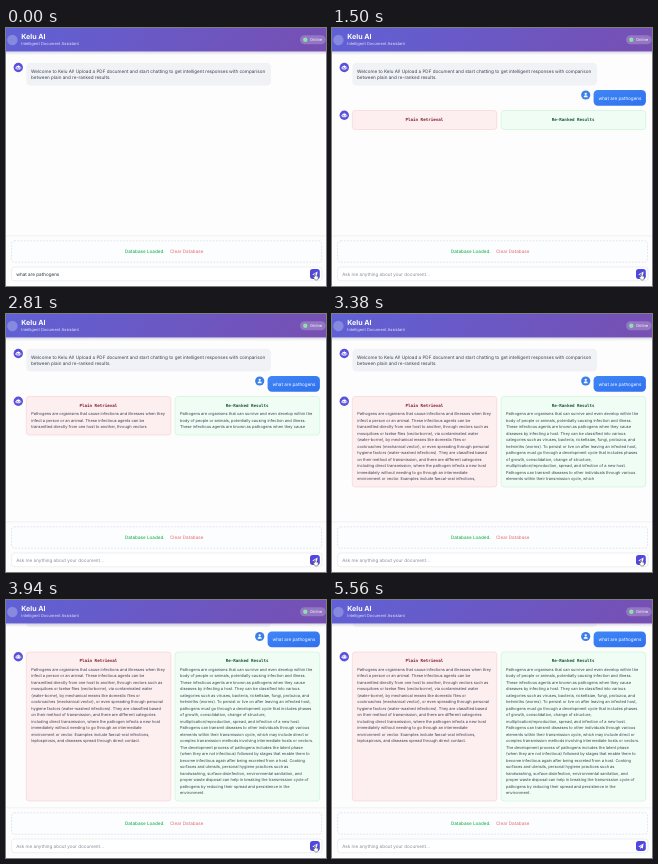
An HTML page for the animation above (5.62 s loop, 320 px wide and 258 px high).

```html
<!DOCTYPE html>
<html lang="en">
<head>
<meta charset="utf-8">
<title>Document chat</title>
<style>
  html, body { margin: 0; width: 100%; height: 100%; overflow: hidden; background: #fdfdfe; }
  svg { display: block; width: 100vw; height: 100vh; }
  text { font-family: Inter, sans-serif; font-size: 4.6px; text-rendering: geometricPrecision; white-space: pre; }
  .body text { font-size: 3.97px; fill: #374151; }
  .body .cardTitle { font: bold 4.2px "DejaVu Sans Mono", monospace; text-anchor: middle; }
  .small { font-size: 4.03px; }
  .brand { font-size: 7.05px; font-weight: 700; }
</style>
</head>
<body>
<svg viewBox="0 0 320 258" preserveAspectRatio="none">
  <defs>
    <linearGradient id="head" gradientUnits="userSpaceOnUse" x1="74" y1="-74" x2="246" y2="98">
      <stop offset="0" stop-color="#5f61d6"/>
      <stop offset="1" stop-color="#774fb1"/>
    </linearGradient>
    <linearGradient id="shade" x1="0" y1="0" x2="0" y2="1">
      <stop offset="0" stop-color="#4b4680" stop-opacity=".2"/>
      <stop offset="1" stop-color="#4b4680" stop-opacity="0"/>
    </linearGradient>
    <linearGradient id="bubble" x1="0" y1="0" x2="1" y2="1">
      <stop offset="0" stop-color="#3f87f6"/>
      <stop offset="1" stop-color="#2f70ee"/>
    </linearGradient>
    <g id="bot">
      <circle r="4.7" fill="#5a50dc"/>
      <path d="M0-2.5V-1.4M-2.6-.3V1.2M2.6-.3V1.2" stroke="#fff" stroke-width=".6"/>
      <rect x="-2" y="-1.5" width="4" height="3.5" rx=".7" fill="#fff"/>
      <path d="M-1.3-.3h.8v.8h-.8zM.5-.3h.8v.8H.5zM-1.2 1.1h2.4v.4h-2.4z" fill="#5a50dc"/>
    </g>
  </defs>

  <rect width="320" height="258" fill="#fdfdfe"/>

  <g id="chat">
    <use href="#bot" x="12.3" y="39.5"/>
    <rect x="20.3" y="34.8" width="244.7" height="22.8" rx="4.3" fill="#f1f2f5"/>
    <g fill="#374151">
      <text x="25" y="44.6">Welcome to Kelu AI! Upload a PDF document and start chatting to get intelligent responses with comparison</text>
      <text x="25" y="51.3">between plain and re-ranked results.</text>
    </g>
    <g id="reply">
      <circle cx="253.7" cy="67" r="4.6" fill="#3b7fe8"/>
      <circle cx="253.7" cy="65.8" r="1.15" fill="#fff"/>
      <path d="M251.6 69.3a2.1 2.1 0 0 1 4.2 0z" fill="#fff"/>
      <rect x="261.6" y="62" width="52.3" height="15.7" rx="4.2" fill="url(#bubble)"/>
      <text x="266.4" y="71.6" fill="#fff">what are pathogens</text>
      <use href="#bot" x="12.3" y="87.3"/>
      <g class="body" id="cards"></g>
    </g>
  </g>

  <rect y="23.5" width="320" height="3.5" fill="url(#shade)"/>
  <rect width="320" height="23.5" fill="url(#head)"/>
  <circle cx="6.4" cy="12" r="5.2" fill="#8789df"/>
  <text class="brand" x="15.3" y="11.1" fill="#fff">Kelu AI</text>
  <text class="small" x="15.3" y="17.4" fill="#e4e3f8">Intelligent Document Assistant</text>
  <rect x="294" y="7.3" width="25.8" height="9" rx="4.5" fill="#fff" fill-opacity=".22"/>
  <circle cx="299.3" cy="11.8" r="2.2" fill="#8be0ac"/>
  <text class="small" x="304" y="13.2" fill="#fff">Online</text>

  <rect y="207.5" width="320" height="50.5" fill="#fdfdfe"/>
  <path d="M0 207.8H320" stroke="#e3e5ea" stroke-width=".5"/>
  <rect x="5.6" y="212.8" width="310" height="21.4" rx="3" fill="#fcfdfe" stroke="#c9d3df" stroke-width=".6" stroke-dasharray="1.8 1.4"/>
  <text x="118.9" y="225.3" fill="#22b455" font-weight="500">Database Loaded.</text>
  <text x="164" y="225.3" fill="#e0696e">Clear Database</text>
  <rect x="5.6" y="239" width="310.4" height="13.8" rx="3" fill="#fff" stroke="#dfe3ea" stroke-width=".6"/>
  <text id="field" x="10.2" y="247.6"></text>
  <rect x="304" y="241.1" width="9.8" height="9.8" rx="2.6" fill="#5147df"/>
  <path d="M306.3 246.4L311.6 243.5L310.8 248.4L309.2 247.7L308.3 248.9V247.3L310.5 244.8L307.7 247Z" fill="#fff"/>
  <path id="hand" d="M308.6 249V246.3q0-.6.5-.6t.5.6V247.8l2.1.5q.7.2.6 1l-.3 1.9q-.2.8-1 .8h-1.4q-.6 0-.9-.5l-1.4-2q-.2-.5.3-.7z"
        fill="#fff" stroke="#222" stroke-width=".45"/>
</svg>

<script>
const LOOP = 5620, SEND = 380;
const TOP = 82.5, EMPTY = 19, PITCH = 6.5, VIEW_BOTTOM = 201;

const plain = `Pathogens are organisms that cause infections and illnesses when they
infect a person or an animal. These infectious agents can be
transmitted directly from one host to another, through vectors such as
mosquitoes or tsetse flies (vectorborne), via contaminated water
(water-borne), by mechanical means like domestic flies or
cockroaches (mechanical vector), or even spreading through personal
hygiene factors (water-washed infections). They are classified based
on their method of transmission, and there are different categories
including direct transmission, where the pathogen infects a new host
immediately without needing to go through an intermediate
environment or vector. Examples include faecal-oral infections,
leptospirosis, and diseases spread through direct contact.`;

const ranked = `Pathogens are organisms that can survive and even develop within the
body of people or animals, potentially causing infection and illness.
These infectious agents are known as pathogens when they cause
diseases by infecting a host. They can be classified into various
categories such as viruses, bacteria, rickettsiae, fungi, protozoa, and
helminths (worms). To persist or live on after leaving an infected host,
pathogens must go through a development cycle that includes phases
of growth, consolidation, change of structure,
multiplication/reproduction, spread, and infection of a new host.
Pathogens can transmit diseases to other individuals through various
elements within their transmission cycle, which may include direct or
complex transmission methods involving intermediate hosts or vectors.
The development process of pathogens includes the latent phase
(when they are not infectious) followed by stages that enable them to
become infectious again after being excreted from a host. Cooking
surfaces and utensils, personal hygiene practices such as
handwashing, surface disinfection, environmental sanitation, and
proper waste disposal can help in breaking the transmission cycle of
pathogens by reducing their spread and persistence in the
environment.`;

const $ = id => document.getElementById(id);

function add(parent, tag, attrs, text = '') {
  const el = document.createElementNS('http://www.w3.org/2000/svg', tag);
  for (const key in attrs) el.setAttribute(key, attrs[key]);
  el.textContent = text;
  return parent.appendChild(el);
}

function makeCard(x, title, colors, copy, steps) {
  const [fill, stroke, ink] = colors;
  const box = add($('cards'), 'rect', { x, y: TOP, width: 144.6, height: EMPTY, rx: 3, fill, stroke, 'stroke-width': .6 });
  add($('cards'), 'text', { x: x + 72.1, y: 92.8, class: 'cardTitle', style: `fill:${ink}` }, title);
  const lines = copy.split('\n').map(line => line.split(' '));
  const rows = lines.map((_, i) => add($('cards'), 'text', { x: x + 4.9, y: 101.3 + i * PITCH }));
  return { box, lines, rows, steps };
}

// Steps pair a time with the number of words shown by then.
const cards = [
  makeCard(20.3, 'Plain Retrieval', ['#fdeef0', '#f5ced4', '#7f1d2b'], plain,
    [[2562, 0], [2810, 30.05], [3380, 99.05], [3450, 107]]),
  makeCard(169.1, 'Re-Ranked Results', ['#f0fdf4', '#c8f1d4', '#17553a'], ranked,
    [[2562, 0], [2810, 31.05], [3380, 102.05], [3925, 181]])
];

function along(steps, t) {
  if (t <= steps[0][0]) return steps[0][1];
  for (let i = 1; i < steps.length; i++) {
    const [t0, v0] = steps[i - 1], [t1, v1] = steps[i];
    if (t < t1) return v0 + (v1 - v0) * (t - t0) / (t1 - t0);
  }
  return steps[steps.length - 1][1];
}

// Fills a card and returns how many lines are in use.
function fillCard(card, t) {
  let left = Math.floor(along(card.steps, t)), used = 0;
  card.lines.forEach((words, i) => {
    const shown = words.slice(0, Math.max(0, left)).join(' ');
    if (card.rows[i].textContent !== shown) card.rows[i].textContent = shown;
    if (shown) used++;
    left -= words.length;
  });
  return used;
}

function render(t) {
  const sent = t >= SEND;
  $('reply').style.display = sent ? '' : 'none';
  $('field').textContent = sent ? 'Ask me anything about your document...' : 'what are pathogens';
  $('field').setAttribute('fill', sent ? '#868d99' : '#27303f');

  const height = EMPTY + PITCH * Math.max(...cards.map(card => fillCard(card, t)));
  cards.forEach(card => card.box.setAttribute('height', height));
  const scroll = Math.max(0, TOP + height - VIEW_BOTTOM);
  $('chat').setAttribute('transform', `translate(0 ${-scroll})`);

  const drop = along([[4250, 0], [4450, 14]], t);
  $('hand').setAttribute('transform', `translate(0 ${drop})`);
}

const start = performance.now();
function tick(now) {
  render(Math.max(0, now - start) % LOOP);
  requestAnimationFrame(tick);
}
render(0);
requestAnimationFrame(tick);
</script>
</body>
</html>
```
